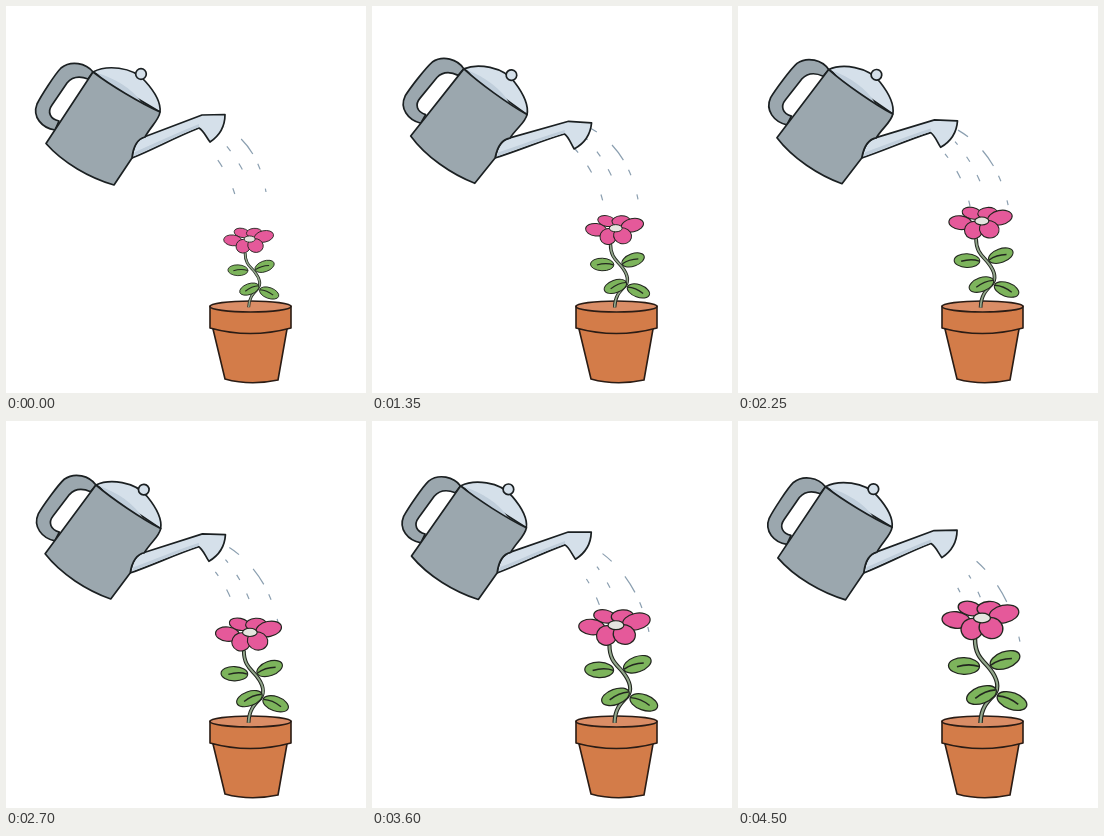
Recreate the animation shown at these times as an HTML page. Size 360 by 387 pixels, loop 4.95 s.

```html
<!DOCTYPE html>
<html lang="en">
<head>
<meta charset="utf-8">
<title>Watering can and flower</title>
<style>
html, body { margin: 0; width: 100%; height: 100%; overflow: hidden; background: #fff; }
svg { display: block; width: 100%; height: 100%; }
svg * { stroke-linejoin: round; }
#can { stroke: #1b2022; stroke-width: 1.7; }
#pot { stroke: #2a1c15; stroke-width: 1.6; }
#plant { stroke: #22261f; stroke-width: 1.3; }
#water { stroke: #8b9fb0; stroke-width: 1.2; fill: none; }
.steel { fill: #9ba7ae; }
.light { fill: #d5e0ea; }
.shade { fill: #c0cedb; stroke: none; }
.clay { fill: #d37c49; }
.leaf { fill: #7db45c; }
.petal { fill: #e5599a; }
.heart { fill: #e5e5df; }
</style>
</head>
<body>
<svg viewBox="0 0 360 387">
  <g id="water"></g>

  <g id="can">
    <path class="steel" fill-rule="evenodd" d="M87 66C80 57 65 54 55 62C49 68 35 90 31 98C26 111 36 122 49 124L53 115C44 113 41 106 46 99L61 77C66 71 74 70 82 73Z"/>
    <path class="light" d="M126 152C127 143 130 134 138 131L196 109L219 108.500C219 120 213 130 204 136C200 131 198 125 193 122C170 131 148 143 126 152Z"/>
    <path class="shade" d="M128 150C148 141 170 130 193 121L193 118C170 127 150 137 129 146Z"/>
    <path class="light" d="M87 66C100 59 126 60 139 75C149 86 155 97 154 106Z"/>
    <path class="shade" d="M91 67C108 72 126 82 136 97C118 89 102 79 91 67Z"/>
    <circle class="light" cx="135" cy="68" r="5.300"/>
    <path class="steel" d="M87 66C104 79 134 97 154 106C153 114 145 120 139 131C131 133 127 142 126 152L108 179C84 172 57 157 40 137.500Z"/>
  </g>

  <g id="pot">
    <path class="clay" d="M207 323L219 373Q244 380 272 374L281 323Z"/>
    <path class="clay" d="M204 300V322Q244 333 285 322V300Z"/>
    <ellipse cx="244.500" cy="300.500" rx="40.500" ry="5.500" fill="#da8d66"/>
  </g>

  <g id="plant"></g>
</svg>
<script>
const STEP = 450, STEPS = 11;
const $ = id => document.getElementById(id);

const oval = (cls, x, y, rx, ry, turn) =>
  `<ellipse class="${cls}" rx="${rx}" ry="${ry}" transform="translate(${x} ${y}) rotate(${turn})"/>`;
const petal = (...shape) => oval("petal", ...shape);

// side: 1 when the stem is on the right of the leaf, -1 when on the left
const leaf = (x, y, turn, side) => oval("leaf", x, y, 15.5, 8.3, turn) +
  `<path fill="none" stroke-width="1.600" transform="translate(${x} ${y}) rotate(${turn})" d="M${side * 15} 0Q${side * 5} -3 ${side * -7} 1"/>`;

const stem = (color, width) => `<path fill="none" stroke="${color}" stroke-width="${width}"
  d="M237 218C237 236 246 240 252 248C259 257 262 267 256 274C249 281 243 287 242.500 302"/>`;

$("plant").innerHTML = stem("#22261f", 4.5) + stem("#93a78c", 2.2) +
  leaf(226, 245, 2, 1) + leaf(267, 239, -20, -1) +
  leaf(243.5, 274, -20, 1) + leaf(274, 280, 20, -1) +
  petal(232, 187.5, 12, 7, 12) + petal(251, 187.5, 12, 7, -4) +
  petal(218, 199, 14, 8.3, 6) + petal(266, 193, 15, 8.8, -12) +
  petal(234, 208, 11, 10.5, -20) + petal(253, 207, 12, 10.5, 15) +
  oval("heart", 244, 197, 8.5, 4.8, 0);

// Each stream is a curve with dashes that slide along it from the spout.
const streams = [
  { lead: 90, dashes: "12 20 19 11 6 20 5",
    path: k => `M219 ${121 + k / 2}Q${252 + 1.8 * k} ${139 + 1.7 * k} ${260 + 2.3 * k} ${186 + 4 * k}` },
  { lead: 102, dashes: "4 15 6 15 7", path: () => "M208 126Q232 150 243 178" },
  { lead: 95, dashes: "5 16 8 24 6", path: () => "M203 143Q225 168 232 200" }
];
$("water").innerHTML = streams.map(s =>
  `<path stroke-dasharray="0 ${s.lead} ${s.dashes} 999"/>`).join("");

function paint(k) {
  const tilt = k ? 2.75 * (1 + Math.cos(Math.PI * (k - 1) / STEPS)) : 0;
  const size = 0.65 + 0.035 * k;
  const flow = 2 * (k - 1) + 0.2 * (k - 1) ** 2;
  $("can").setAttribute("transform", `rotate(${tilt} 125 119)`);
  $("plant").setAttribute("transform", `translate(243 300) scale(${size}) translate(-243 -300)`);
  streams.forEach((s, i) => {
    const line = $("water").children[i];
    line.setAttribute("d", s.path(k));
    line.setAttribute("stroke-dashoffset", 100 - flow);
  });
}

const start = performance.now();
function tick() {
  paint(Math.floor((performance.now() - start) / STEP) % STEPS);
  requestAnimationFrame(tick);
}
tick();
</script>
</body>
</html>
```
